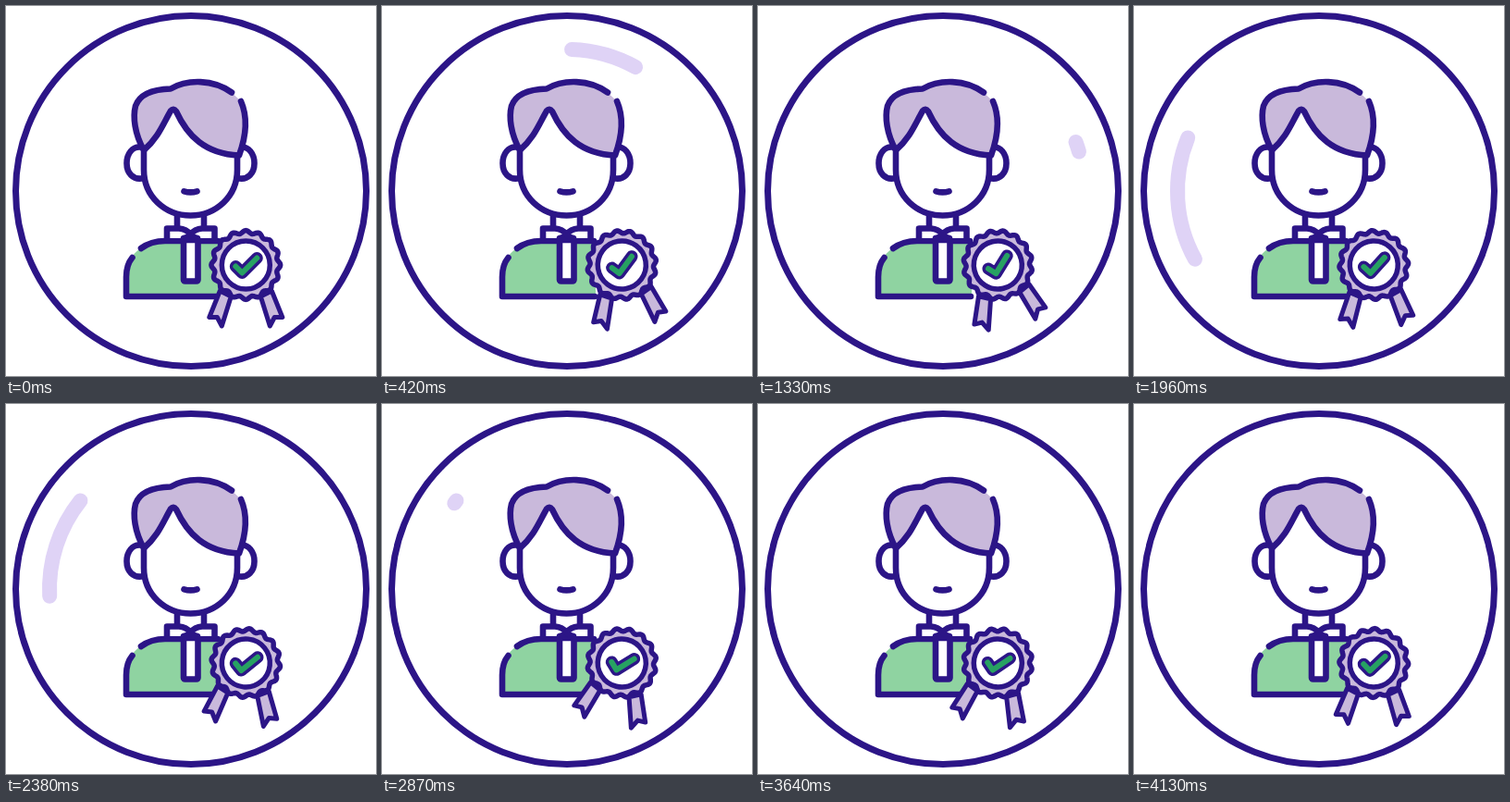
An HTML page that plays this animation: 400 by 400 pixels, repeating every 4.2 s.

```html
<!DOCTYPE html>
<html lang="en">
<head>
<meta charset="utf-8">
<title>Certified person</title>
<style>
  html, body { margin: 0; width: 100%; height: 100%; overflow: hidden; background: #fff; }
  svg { display: block; width: 100vw; height: 100vh; }
  .line { fill: none; stroke: #2c1587; stroke-width: 6.6; stroke-linecap: round; stroke-linejoin: round; }
  .white { fill: #fff; }
  .lilac { fill: #c9b9db; }
  .green { fill: #8fd3a1; }
  .sweep { fill: none; stroke: #dfd3f6; stroke-width: 16; stroke-linecap: round; }
</style>
</head>
<body>
<svg viewBox="0 0 400 400">
  <circle class="line" cx="200" cy="200" r="189.5" style="stroke-width:7"/>
  <path class="sweep" id="sweepRight"/>
  <path class="sweep" id="sweepLeft"/>

  <!-- shirt -->
  <path class="green" d="M130 314V293C130 270 147 254 172 254H231V314Z"/>
  <path class="line" d="M136.500 272C131.500 278 130 285 130 293V314H230M146 262C154 256 162 254 172 254H229"/>
  <rect class="line white" x="192" y="253" width="15.500" height="44.500" rx="1.500"/>

  <!-- neck and collar -->
  <path class="line white" d="M185 226V242L199.500 249L214 242V226"/>
  <path class="line white" d="M174 250.500V240.500H187Q195 241 199.500 247Q196 250.500 192 251"/>
  <path class="line white" d="M225.500 250.500V240.500H212Q204 241 199.500 247Q203 250.500 207 251"/>

  <!-- head -->
  <path class="line white" d="M148 153C136 150 130.500 161 130.500 170C130.500 180 137 189 149 186"/>
  <path class="line white" d="M251 153C263 150 268.500 161 268.500 170C268.500 180 262 189 250 186"/>
  <path class="line white" d="M149 156V177C149 206 172 226.500 199.500 226.500C227 226.500 250 206 250 177V161"/>
  <path class="line" d="M192.500 200.300Q199.500 202.500 206.500 200.300"/>
  <path class="lilac" d="M149 156C139 138 137 120 140 108C145 94 160 90 178 89.500C196 79 224 79 244 93.500L254 103C261 119 261 137 252 161.500C215 160 196 140 184 114Q181 110 178 113.500C170 127 165 142 149 156Z"/>
  <path class="line" d="M244 93.500C224 79 196 79 178 89.500C160 90 145 94 140 108C137 120 139 138 149 156C165 142 170 127 178 113.500Q181 110 184 114C196 140 215 160 252 161.500C261 137 261 119 254 103"/>

  <!-- rosette, centred on its own origin -->
  <g id="badge">
    <g class="line lilac" style="fill:#c9b9db;stroke-width:5">
      <path id="ribbon" d="M-28 28L-39.500 56.500L-31 56.500L-26 66L-16 34Z"/>
      <use href="#ribbon" transform="scale(-1 1)"/>
    </g>
    <path class="line" id="rosette" style="fill:#c9b9db;stroke-width:5.500"/>
    <circle class="line" r="26" style="fill:#fff;stroke-width:5.500"/>
    <path class="line" id="tick" d="M-11 1.500L-4 8.500L12 -7.500" style="stroke-width:13"/>
    <path class="line" d="M-11 1.500L-4 8.500L12 -7.500" style="stroke:#27a162;stroke-width:6"/>
  </g>
</svg>
<script>
const LOOP = 4200, STEP = 70, SWING = 14.6;
const byId = id => document.getElementById(id);

// Angles run clockwise from twelve o'clock, in degrees.
const polar = (radius, degrees) => {
  const a = degrees * Math.PI / 180;
  return `${(radius * Math.sin(a)).toFixed(2)} ${(-radius * Math.cos(a)).toFixed(2)}`;
};

const sweeps = [
  { node: byId('sweepRight'), from: 1.9, to: 73.9, head: [0, 1000], tail: [484, 1484] },
  { node: byId('sweepLeft'), from: 241.2, to: 308.6, head: [1370, 2250], tail: [1950, 2960] }
];

function ease(t, [start, end]) {
  const x = Math.min(1, Math.max(0, (t - start) / (end - start)));
  return (1 - Math.cos(Math.PI * x)) / 2;
}

function drawSweep({ node, from, to, head, tail }, t) {
  const a = from + (to - from) * ease(t, tail);
  const b = from + (to - from) * ease(t, head);
  node.setAttribute('d', b - a > 0.05 ? `M${polar(153, a)}A153 153 0 0 1 ${polar(153, b)}` : '');
}

function rosettePath(lobes) {
  const points = [];
  for (let a = 0; a < 360; a += 2) {
    points.push(polar(35.8 + 1.6 * Math.cos(lobes * a * Math.PI / 180), a));
  }
  return `M${points.join('L')}Z`;
}

function render(t) {
  const angle = -SWING * Math.sin(2 * Math.PI * t / LOOP);
  byId('badge').setAttribute('transform', `translate(259.3 280) rotate(${angle.toFixed(3)})`);
  for (const sweep of sweeps) drawSweep(sweep, t);
}

byId('rosette').setAttribute('d', rosettePath(16));
for (const { node } of sweeps) node.setAttribute('transform', 'translate(200 200)');

const begin = performance.now();
function tick() {
  const t = (performance.now() - begin) % LOOP;
  render(Math.floor(t / STEP) * STEP);
  requestAnimationFrame(tick);
}
tick();
</script>
</body>
</html>
```
